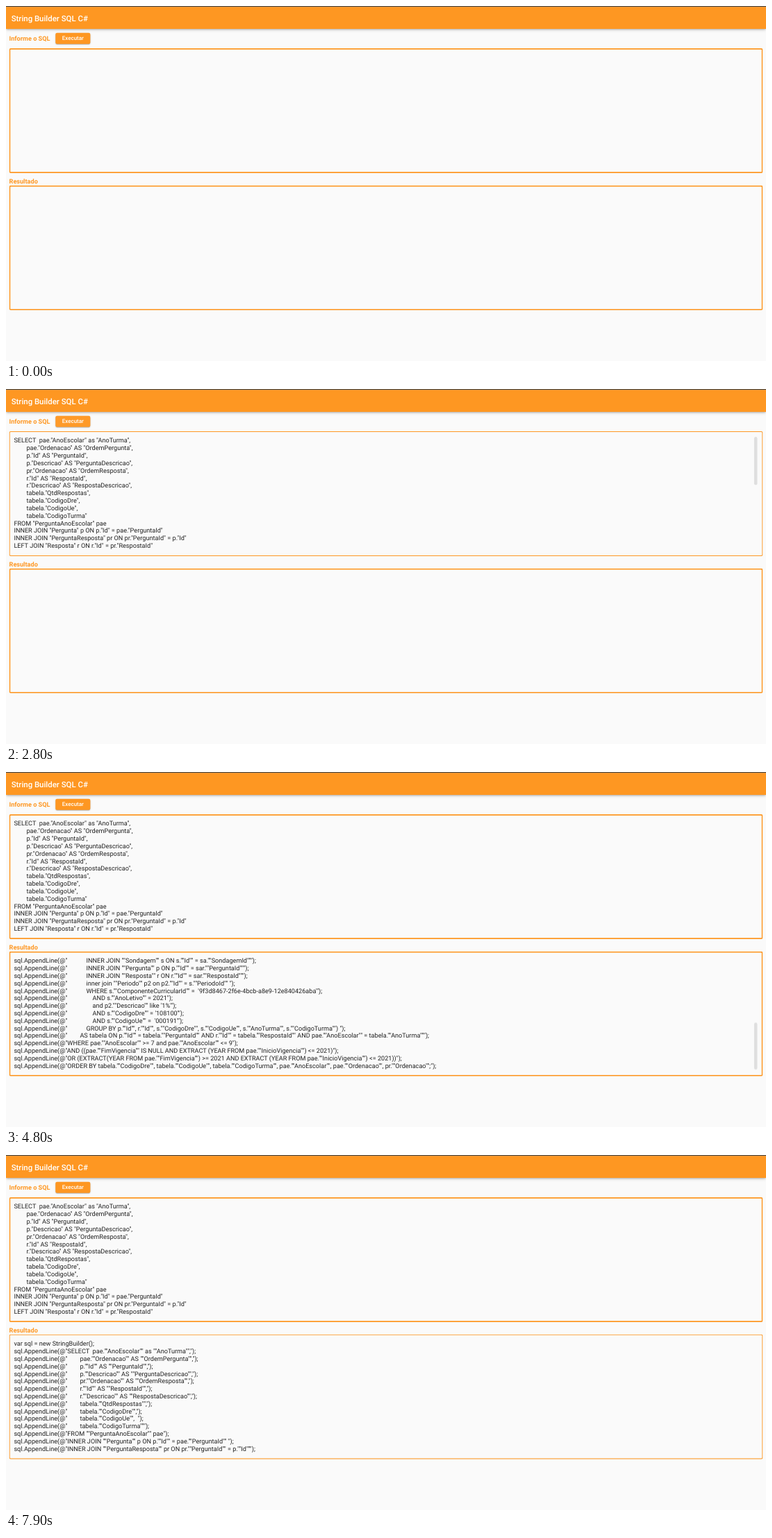
An HTML page that plays this animation: 1094x512 px, repeating every 8000 ms.

```html
<!DOCTYPE html>
<html lang="pt-BR">
<head>
<meta charset="utf-8">
<title>String Builder SQL C#</title>
<style>
@property --y { syntax: "<number>"; inherits: true; initial-value: 0; }
@property --edge { syntax: "<length>"; inherits: true; initial-value: 3px; }

html, body { margin: 0; width: 100%; height: 100%; overflow: hidden; background: #fafafa; }

/* Laid out 1920 wide, shown at 1094 */
#app {
  --orange: #fe9722;
  position: absolute; left: 0; top: 0; width: 1920px; height: 899px;
  transform: scale(.569792); transform-origin: 0 0;
  font: 16px/19px Roboto, sans-serif; text-rendering: geometricPrecision;
}
#app * { position: absolute; box-sizing: border-box; margin: 0; white-space: pre; }

.top { left: 0; top: 0; width: 1920px; height: 1.8px; background: #45423e; }
header {
  left: 0; top: 1.8px; width: 1920px; height: 56px; background: var(--orange);
  box-shadow: 0 2px 4px -1px #0003, 0 4px 5px #00000024, 0 1px 10px #0000001f;
}
h1 { left: 13.5px; top: 17px; font-size: 20px; line-height: 24px; font-weight: 500; color: #fff; }
.label { left: 8px; font-weight: 700; color: var(--orange); }
.run {
  left: 125px; top: 68.4px; width: 88px; height: 28px; border-radius: 4px;
  font-size: 14px; line-height: 28px; font-weight: 500; text-align: center;
  color: #fff; background: var(--orange);
  box-shadow: 0 3px 1px -2px #0003, 0 2px 2px #00000024, 0 1px 5px #0000001f;
}

.field {
  left: 8px; width: 1904px; height: 316px; border-radius: 4px;
  box-shadow: inset 0 0 0 var(--edge) var(--orange);
}
.view { left: 12px; top: 14.5px; width: 1880px; height: 285px; overflow: hidden; }
.text { left: 0; top: 0; color: rgba(0, 0, 0, .87); transform: translateY(calc(var(--y) * -1px)); }
.thumb {
  right: 2px; top: 0; width: 8px; border-radius: 4px; background: #0000001c;
  transform: translateY(calc(var(--y) * var(--ratio) * 1px));
}
#sql { top: 106.5px; --ratio: .42857; }
#sql .thumb { height: 122px; }
#out { top: 453.5px; --ratio: .41667; }
#out .thumb { height: 119px; }

.run, .field, .view, .text, .thumb { animation: 8s step-end -5ms infinite; }
.run { animation-name: press; }
#sql { animation-name: sql-edge; }
#sql .view { animation-name: sql-scroll; }
#sql .text { animation-name: sql-show; }
#sql .thumb { animation-name: sql-bar; }
#out { animation-name: out-edge; }
#out .view { animation-name: out-scroll; }
#out .text { animation-name: out-show; }
#out .thumb { animation-name: out-bar; }

@keyframes press {
  0%, 46.25%, 100% { background: var(--orange); }
  35% { background: #fe9a29; }
  36.25% { background: #fe9f34; }
  41.25% { background: #feb05a; }
  42.5% { background: #fea848; }
}
@keyframes sql-edge {
  0%, 42.5%, 100% { --edge: 3px; }
  11.25%, 41.25% { --edge: 2.5px; }
  12.5% { --edge: 2px; }
}
@keyframes sql-show { 0% { opacity: 0; } 13.75%, 100% { opacity: 1; } }
@keyframes sql-scroll {
  0% { --y: 380; }
  27.5% { --y: 280; }
  28.75% { --y: 80; }
  30%, 100% { --y: 0; }
}
@keyframes sql-bar {
  0%, 50%, 100% { opacity: 0; }
  13.75% { opacity: .3; }
  15% { opacity: .7; }
  16.25% { opacity: 1; }
  46.25% { opacity: .75; }
  47.5% { opacity: .5; }
  48.75% { opacity: .25; }
}
@keyframes out-edge {
  0% { --edge: 3px; }
  97.5% { --edge: 2.5px; }
  98.75%, 100% { --edge: 2px; }
}
@keyframes out-show { 0% { opacity: 0; } 41.25%, 100% { opacity: 1; } }
@keyframes out-scroll {
  0%, 81.25%, 100% { --y: 0; }
  55% { --y: 100; }
  56.25% { --y: 300; }
  60% { --y: 399; }
  78.75% { --y: 299; }
  80% { --y: 99; }
}
@keyframes out-bar {
  0%, 72.5%, 90%, 100% { opacity: 0; }
  55% { opacity: .5; }
  56.25%, 81.25% { opacity: 1; }
  70% { opacity: .67; }
  71.25% { opacity: .33; }
  78.75% { opacity: .12; }
  80% { opacity: .6; }
}
</style>
</head>
<body>
<div id="app">
  <header><h1>String Builder SQL C#</h1></header>
  <div class="top"></div>
  <div class="label" style="top:73px">Informe o SQL</div>
  <div class="run">Executar</div>
  <div class="field" id="sql"><div class="view"><div class="text"></div><div class="thumb"></div></div></div>
  <div class="label" style="top:433.5px">Resultado</div>
  <div class="field" id="out"><div class="view"><div class="text"></div><div class="thumb"></div></div></div>
</div>
<script>
const pad = n => ' '.repeat(n);
const lines = [
  'SELECT  pae."AnoEscolar" as "AnoTurma",',
  ...[
    'pae."Ordenacao" AS "OrdemPergunta",',
    'p."Id" AS "PerguntaId",',
    'p."Descricao" AS "PerguntaDescricao",',
    'pr."Ordenacao" AS "OrdemResposta",',
    'r."Id" AS "RespostaId",',
    'r."Descricao" AS "RespostaDescricao",',
    'tabela."QtdRespostas",',
    'tabela."CodigoDre",',
    'tabela."CodigoUe",  ',
    'tabela."CodigoTurma"',
  ].map(s => pad(8) + s),
  'FROM "PerguntaAnoEscolar" pae',
  'INNER JOIN "Pergunta" p ON p."Id" = pae."PerguntaId" ',
  'INNER JOIN "PerguntaResposta" pr ON pr."PerguntaId" = p."Id"',
  'LEFT JOIN "Resposta" r ON r."Id" = pr."RespostaId" ',
  'LEFT JOIN ( SELECT p."Id" AS "PerguntaId",',
  pad(20) + 'r."Id" AS "RespostaId", COUNT(1) AS "QtdRespostas",',
  pad(20) + 's."CodigoDre", s."CodigoUe", s."AnoTurma", s."CodigoTurma"',
  ...[
    'FROM "SondagemAlunoRespostas" sar',
    'INNER JOIN "SondagemAluno" sa ON sa."Id" = sar."SondagemAlunoId"',
    'INNER JOIN "Sondagem" s ON s."Id" = sa."SondagemId"',
    'INNER JOIN "Pergunta" p ON p."Id" = sar."PerguntaId"',
    'INNER JOIN "Resposta" r ON r."Id" = sar."RespostaId"',
    'inner join "Periodo" p2 on p2."Id" = s."PeriodoId" ',
    'WHERE s."ComponenteCurricularId" =  \'9f3d8467-2f6e-4bcb-a8e9-12e840426aba\'',
    '    AND s."AnoLetivo" = 2021',
    '    and p2."Descricao" like \'1%\'',
    '    AND s."CodigoDre" = \'108100\'',
    '    AND s."CodigoUe" =  \'000191\'',
    'GROUP BY p."Id", r."Id", s."CodigoDre", s."CodigoUe", s."AnoTurma", s."CodigoTurma") ',
  ].map(s => pad(12) + s),
  pad(8) + 'AS tabela ON p."Id" = tabela."PerguntaId" AND r."Id" = tabela."RespostaId" AND pae."AnoEscolar" = tabela."AnoTurma"',
  'WHERE pae."AnoEscolar" >= 7 and pae."AnoEscolar" <= 9',
  'AND ((pae."FimVigencia" IS NULL AND EXTRACT (YEAR FROM pae."InicioVigencia") <= 2021)',
  'OR (EXTRACT(YEAR FROM pae."FimVigencia") >= 2021 AND EXTRACT (YEAR FROM pae."InicioVigencia") <= 2021))',
  'ORDER BY tabela."CodigoDre", tabela."CodigoUe", tabela."CodigoTurma", pae."AnoEscolar", pae."Ordenacao", pr."Ordenacao";',
];
const append = s => `sql.AppendLine(@"${s.replaceAll('"', '""')}");`;
const fill = (id, rows) => {
  document.querySelector(`#${id} .text`).textContent = rows.join('\n');
};
fill('sql', lines);
fill('out', ['var sql = new StringBuilder();', ...lines.map(append)]);
</script>
</body>
</html>
```
